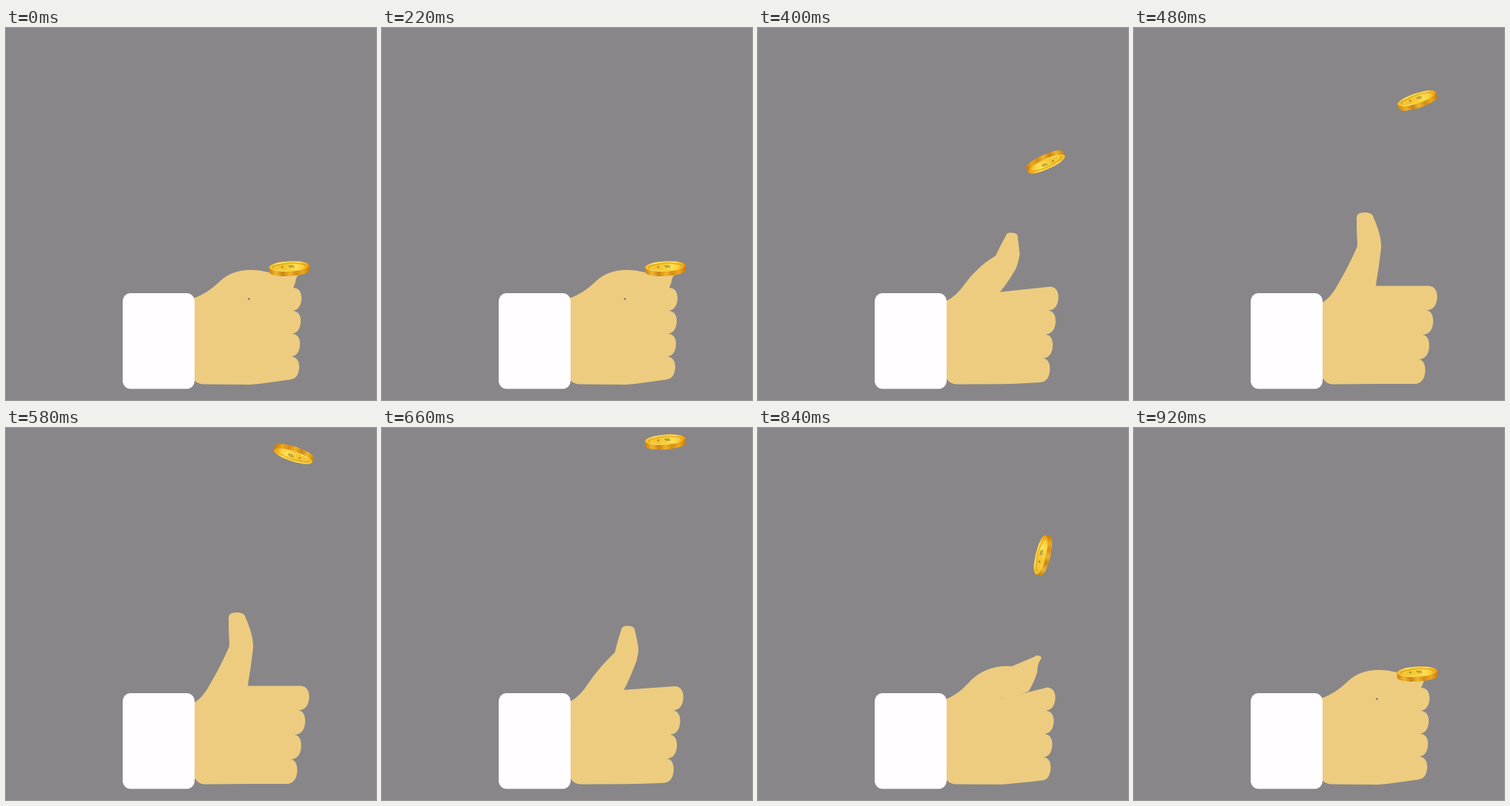
An HTML page with a canvas that plays this animation: 482 by 484 pixels, repeating every 940 ms.

```html
<!DOCTYPE html>
<html lang="en">
<head>
<meta charset="utf-8">
<title>Coin flip</title>
<style>
html, body { margin: 0; overflow: hidden; background: #888688; }
canvas { display: block; }
</style>
</head>
<body>
<canvas width="482" height="484"></canvas>
<script>
const ctx = document.querySelector('canvas').getContext('2d');
const LOOP = 940, STEP = 20, LIFT = 220, LAUNCH = 335, APEX = 660, LAND = 920;

// Thumb outline when closed and open: start, joint of the wrist, then control/end pairs
const CLOSED = [246,351, 262,345, 276,332, 300,307, 343,318, 362,316, 382,313, 385,312, 387,314,
                388,315, 387,317, 377,322, 377,331, 372,345, 362,360, 340,362, 316,358];
const OPEN = [246,357, 257,350, 266,333, 279,311, 291,284, 290,265, 290,247, 290,240, 300,240,
              309,240, 311,244, 319,262, 321,274, 322,280, 322,286, 319,312, 315,335];

const mix = (a, b, u) => a + (b - a) * u;
const clamp = u => Math.max(0, Math.min(1, u));

// 0 = thumb folded down, 1 = thumb up
const openness = t => clamp(Math.min(clamp((t - LIFT) / 260) ** 1.2, (LAND - t) / 340));

// Thrown upwards, then pulled down faster
const coinY = t => Math.min(t < LAUNCH ? 313 : 320, 18 + (t < APEX ? .00233 : .00447) * (t - APEX) ** 2);

// Three turns that slow down until landing
const coinAngle = t => 1080 * (1 - (1 - clamp((t - LAUNCH) / (LAND - LAUNCH))) ** 1.35) - 3;

function drawThumb(open) {
  const p = CLOSED.map((v, i) => mix(v, OPEN[i], open));
  ctx.beginPath();
  ctx.moveTo(p[0], p[1]);
  for (let i = 2; i < p.length; i += 4) ctx.quadraticCurveTo(...p.slice(i, i + 4));
  ctx.lineTo(316, 400);
  ctx.lineTo(240, 400);
  ctx.lineTo(240, p[1]);
  ctx.fill();
}

function drawPalm(open) {
  const at = (closed, opened) => mix(closed, opened, open);
  const knuckleY = i => at(338 + 29.8 * i, 335.5 + 31.9 * i);
  ctx.beginPath();
  ctx.moveTo(240, 390);
  ctx.lineTo(at(316, 315), at(358, 335.5));
  ctx.lineTo(at(375, 384), knuckleY(0));
  for (let i = 0; i < 4; i++) {
    const top = knuckleY(i), bottom = knuckleY(i + 1);
    const x = at(385 - i, 395 - 5.2 * i), notch = at(373 - .7 * i, 381 - 5 * i);
    ctx.quadraticCurveTo(x, top + 1, x, (top + bottom) / 2 - 1);
    ctx.quadraticCurveTo(x - 1, bottom - 1, notch, bottom);
  }
  ctx.quadraticCurveTo(340, at(462, 463), 318, at(464, 463));
  ctx.lineTo(259, 463.5);
  ctx.quadraticCurveTo(251, 463.5, 246, at(459, 456));
  ctx.lineTo(240, 456);
  ctx.fill();
}

function ellipse(x, y, rx, ry, fill) {
  ctx.fillStyle = fill;
  ctx.beginPath();
  ctx.ellipse(x, y, rx, ry, 0, 0, 2 * Math.PI);
  ctx.fill();
}

function shine(...colors) {
  const g = ctx.createLinearGradient(-26, 0, 26, 0);
  colors.forEach((c, i) => g.addColorStop(i / (colors.length - 1), c));
  return g;
}

function drawCoin(y, degrees) {
  ctx.save();
  ctx.translate(372, y);
  ctx.rotate(degrees * Math.PI / 180);
  ctx.translate(-3, 0);

  ctx.fillStyle = shine('#c98512', '#f0b62c', '#cb8514', '#eeb42c', '#d68d12', '#eda91c', '#cf7a08');
  ctx.beginPath();
  ctx.ellipse(0, 3.4, 26.3, 6.3, 0, 0, Math.PI);
  ctx.ellipse(0, -3, 26.3, 6.6, 0, Math.PI, 2 * Math.PI);
  ctx.fill();

  ellipse(0, -3, 26.3, 6.6, shine('#f2b51c', '#ffe468', '#f7d03c', '#ffe05a', '#e9980c'));
  ellipse(0, -2.9, 22, 4.8, shine('#d69a16', '#e6b324', '#e9a414'));
  ellipse(0, -2.2, 20.5, 4, shine('#f5d041', '#f2c22c', '#ffe153', '#f3bc22'));
  ellipse(-9, -2.8, 1.3, .9, '#8d7738');
  ctx.fillRect(-1, -4.2, 7, .9);
  ctx.fillRect(0, -2.4, 7, .9);
  ctx.restore();
}

function draw() {
  const t = Math.floor(performance.now() % LOOP / STEP) * STEP;
  const open = openness(t);
  ctx.fillStyle = '#888688';
  ctx.fillRect(0, 0, 482, 484);

  ctx.fillStyle = '#edcc80';
  drawThumb(open);
  drawPalm(open);
  if (open < .05) ellipse(316.5, 352.5, 1.4, 1.2, '#857c70');

  ctx.fillStyle = '#fffdff';
  ctx.beginPath();
  ctx.roundRect(152, 345, 93.7, 124.5, 10);
  ctx.fill();

  drawCoin(coinY(t), coinAngle(t));
  requestAnimationFrame(draw);
}
draw();
</script>
</body>
</html>
```
